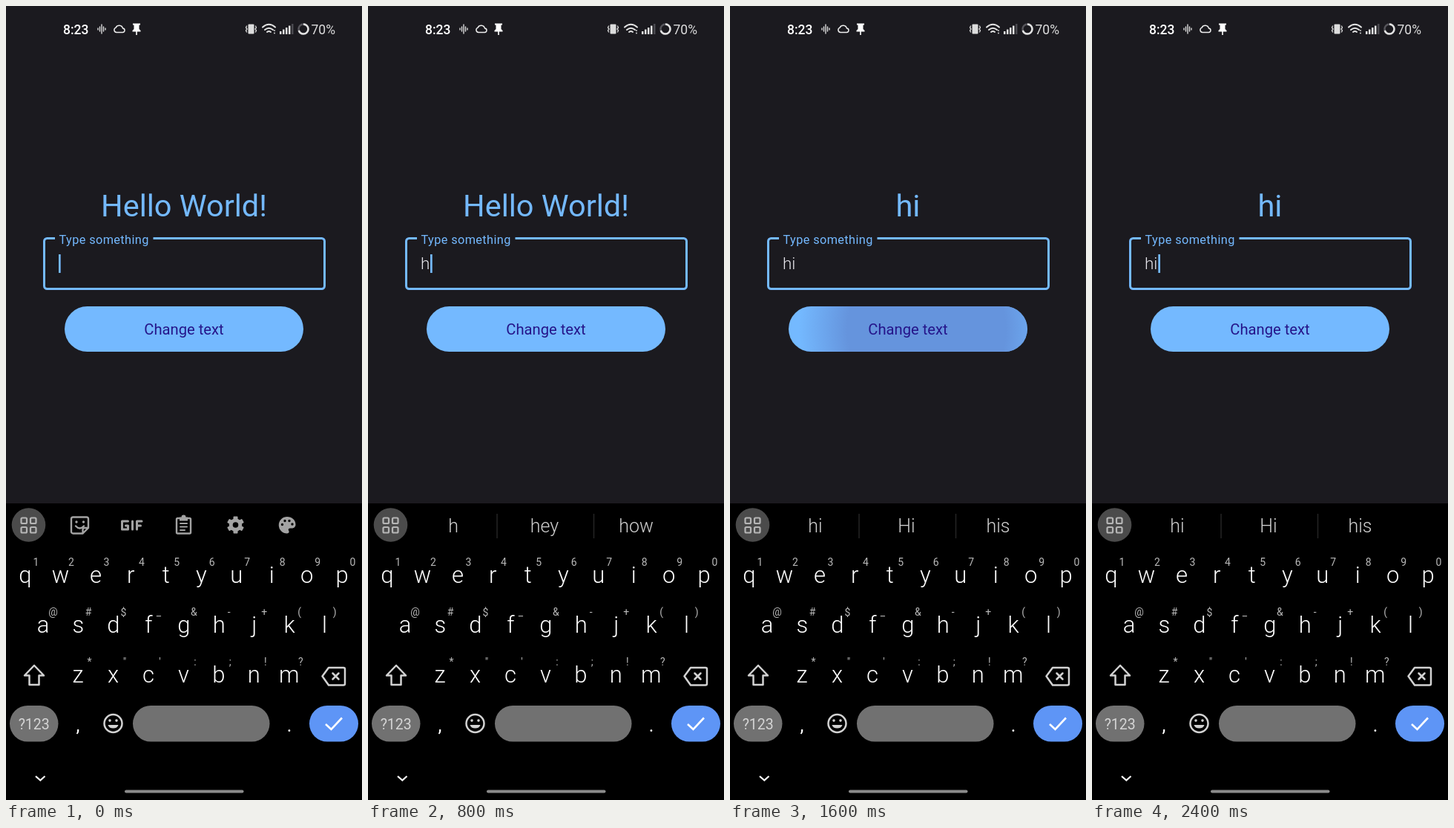
Recreate the animation shown at these times as an HTML page. Size 480x1068 px, loop 2.5 s.

```html
<!DOCTYPE html>
<html lang="en">
<head>
<meta charset="utf-8">
<title>Change text</title>
<style>
  html, body { margin: 0; width: 100%; height: 100%; overflow: hidden; background: #1b1a1f; }
  svg { display: block; width: 100%; height: 100%; }
  text { font-family: Roboto, Inter, sans-serif; fill: #fff; }
  .mid { text-anchor: middle; }
  .status text { font-size: 17.5px; font-weight: 500; }
  .line { fill: none; stroke-linecap: round; stroke-linejoin: round; }
  .tool { stroke: #a3a3a3; stroke-width: 2.4; }
  .key { font-size: 31px; font-weight: 300; }
  .hint { font-size: 14px; fill: #b9b9b9; }
  .word { font-size: 25px; font-weight: 300; fill: #d0d0d0; }
</style>
</head>
<body>
<svg viewBox="0 0 480 1068">
  <defs>
    <radialGradient id="ripple" gradientUnits="userSpaceOnUse" cx="265" cy="435" r="1">
      <stop offset=".62" stop-color="#6594dd"/>
      <stop offset="1" stop-color="#6594dd" stop-opacity="0"/>
    </radialGradient>
  </defs>
  <rect width="480" height="1068" fill="#1b1a1f"/>

  <g class="status">
    <text x="77" y="37.5">8:23</text>
    <path class="line" stroke="#ddd" stroke-width="1.4" d="M124 30v2M126.500 28v6M129 25v12M131.500 28v6M134 30v2"/>
    <path class="line" stroke="#eee" stroke-width="1.5" d="M149 35.500H157a2.700 2.700 0 0 0 .5-5.400a5 5 0 0 0-9.400-1a3.300 3.300 0 0 0 .9 6.400Z"/>
    <path fill="#fff" d="M171 23.500h10v2h-1.500v5.500l2 2v1.500h-4.700v4.500h-1.600v-4.500h-4.700V33l2-2v-5.500H171Z"/>
    <rect x="326.500" y="24.500" width="8" height="13" rx="1" fill="#ddd"/>
    <path class="line" stroke="#ddd" stroke-width="1.3" d="M324.500 27l-1 2 1.500 2-1.500 2 1 2M336.500 27l1 2-1.500 2 1.500 2-1 2"/>
    <g class="line" stroke="#e2e2e2" stroke-width="2">
      <path d="M346 28.500q8.500-7.500 17 0M349 32q5.500-4.500 11 0M352 35q2.500-2 5 0"/>
      <path d="M362 33v.1M362 36.500v.1" stroke-width="1.8"/>
    </g>
    <path fill="#e2e2e2" d="M369 34h2.500v4H369ZM373 31.500h2.500V38H373ZM377 29h2.500v9H377ZM381 26.500h2.500V38H381Z"/>
    <path fill="#4b4a50" d="M385 24h2.500v14H385Z"/>
    <circle cx="401" cy="31" r="6.500" fill="none" stroke="#55545a" stroke-width="2.500"/>
    <circle cx="401" cy="31" r="6.500" fill="none" stroke="#e2e2e2" stroke-width="2.500" pathLength="100"
      stroke-dasharray="70 30" transform="rotate(-90 401 31)"/>
    <text x="411.500" y="37.500" style="fill:#ddd;font-weight:400">70%</text>
  </g>

  <text id="title" class="mid" x="240" y="282.500" style="font-size:41.500px;fill:#74b9ff"></text>
  <path fill="none" stroke="#74b9ff" stroke-width="3"
    d="M66 312.500H55.500a4 4 0 0 0-4 4V376.500a4 4 0 0 0 4 4H425.500a4 4 0 0 0 4-4V316.500a4 4 0 0 0-4-4H198.500"/>
  <text x="71.500" y="320" style="font-size:16.300px;letter-spacing:.4px;fill:#74b9ff">Type something</text>
  <text id="field" x="71" y="354" style="font-size:22.500px;font-weight:300;fill:#e6e5eb"></text>
  <rect id="cursor" y="334" width="2.700" height="25" fill="#74b9ff"/>
  <rect x="79" y="404" width="322" height="61" rx="30.500" fill="#74b9ff"/>
  <rect id="press" x="79" y="404" width="322" height="61" rx="30.500" fill="url(#ripple)"/>
  <text class="mid" x="240" y="442" style="font-size:20.200px;fill:#25158a">Change text</text>

  <rect y="669" width="480" height="399"/>
  <circle cx="30.500" cy="698" r="22.800" fill="#4b4b4b"/>
  <g class="line" stroke="#b5b5b5" stroke-width="2.200">
    <rect x="20.500" y="688.500" width="7.500" height="7.500" rx="1.500"/>
    <rect x="33" y="688.500" width="7.500" height="7.500" rx="1.500"/>
    <rect x="20.500" y="701" width="7.500" height="7.500" rx="1.500"/>
    <rect x="33" y="701" width="7.500" height="7.500" rx="1.500"/>
  </g>

  <g id="tools">
    <g class="line tool">
      <path d="M90.500 687.500h18a2.500 2.500 0 0 1 2.500 2.500v12l-7.500 7.500h-13a2.500 2.500 0 0 1-2.500-2.500v-17a2.500 2.500 0 0 1 2.500-2.500ZM111 702h-5a2.500 2.500 0 0 0-2.500 2.500v5"/>
      <path d="M95 694v.1M104.500 694v.1" stroke-width="3.400"/>
      <path d="M94 699.500q5.500 6 11 0"/>
      <path d="M164.500 693H156.500V704H164.500V699H161.500M170.500 693V704M176.500 704V693H183M176.500 699H181.500" stroke-width="3"/>
      <path d="M234 689H231.500a1.500 1.500 0 0 0-1.500 1.500V708a1.500 1.500 0 0 0 1.500 1.500H247.500a1.500 1.500 0 0 0 1.500-1.500V690.500a1.500 1.500 0 0 0-1.500-1.500H245"/>
      <path d="M235 696H244M235 700.500H244M235 705H241" stroke-width="2"/>
    </g>
    <path fill="#a3a3a3" d="M234 687.500h2.500a3 3 0 0 1 6 0H245V692.500H234Z"/>
    <g id="gear" fill="#a3a3a3"><circle cx="309.500" cy="698" r="8.700"/></g>
    <circle cx="309.500" cy="698" r="3.800"/>
    <path fill="#a3a3a3" d="M379 687a11 11 0 0 0 0 22.500c2.500 0 3.300-2 2.200-3.700c-1.200-2 0-3.300 1.800-3.300h2.500c3 0 5-2.300 5-5c0-6-5-10.500-11.500-10.500Z"/>
    <path class="line" stroke="#000" stroke-width="3.400" d="M372.500 697.500v.1M376 692.500v.1M382 692.500v.1M386 697v.1"/>
  </g>
  <g id="words">
    <path stroke="#242424" stroke-width="1.500" d="M174 683V716M304.500 683V716"/>
    <text class="mid word" x="115" y="708"></text>
    <text class="mid word" x="238" y="708"></text>
    <text class="mid word" x="361.500" y="708"></text>
  </g>

  <g id="keys"></g>

  <g class="line" stroke="#d2d2d2" stroke-width="2.500">
    <path d="M38 887L51 900.500H44.500V913H31.500V900.500H25Z"/>
    <path d="M435 890H455a2 2 0 0 1 2 2V911.500a2 2 0 0 1-2 2H435L426.500 901.500ZM440.500 897.500l8 8M448.500 897.500l-8 8"/>
    <circle cx="144.500" cy="965" r="12"/>
    <path d="M140 961v.1M149 961v.1" stroke-width="3.600"/>
  </g>
  <path fill="#d2d2d2" d="M137.500 967h14a7.200 6 0 0 1-14 0Z"/>
  <g fill="#717171">
    <rect x="5" y="941" width="65.500" height="48.500" rx="24.200"/>
    <rect x="171" y="941" width="184.500" height="48.500" rx="24.200"/>
    <rect x="409" y="941" width="66" height="48.500" rx="24.200" fill="#5e95f6"/>
  </g>
  <text class="mid" x="37.700" y="973" style="font-size:19.500px;fill:#d4d4d4">?123</text>
  <text class="mid" x="97" y="976" style="font-size:25px">,</text>
  <text class="mid" x="382" y="976" style="font-size:25px">.</text>
  <path fill="none" stroke="#fff" stroke-width="2.600" d="M431 966L438.500 973L453 957.500"/>
  <path fill="none" stroke="#fff" stroke-width="2.200" d="M40 1036L46.300 1041.500L52.500 1036"/>
  <rect x="160" y="1054.500" width="160.500" height="4" rx="2" fill="#8b8b8b"/>
</svg>
<script>
const $ = id => document.getElementById(id);
const LOOP = 2500, STEP = 100;
const TYPE_H = 700, TYPE_I = 1100, PRESS = 1400, CHANGE = 1550;

const rows = [
  { letters: "qwertyuiop", hints: "1234567890", x: 26, y: 776, hintX: 14.5 },
  { letters: "asdfghjkl", hints: "@#$_&-+()", x: 50, y: 843, hintX: 13.5 },
  { letters: "zxcvbnm", hints: "*\"':;!?", x: 97, y: 910, hintX: 15.5 },
];
const escapeText = s => s.replace("&", "&amp;");
$("keys").innerHTML = rows.map(({ letters, hints, x, y, hintX }) =>
  [...letters].map((letter, i) => {
    const keyX = x + i * 47.45;
    return `<text class="mid key" x="${keyX}" y="${y}">${letter}</text>` +
      `<text class="mid hint" x="${keyX + hintX}" y="${y - 23}">${escapeText(hints[i])}</text>`;
  }).join("")).join("");

$("gear").innerHTML += [0, 60, 120].map(a =>
  `<rect x="306.500" y="686.500" width="6" height="23" rx="1" transform="rotate(${a} 309.500 698)"/>`).join("");

const clamp = v => Math.max(0, Math.min(1, v));
const show = (el, on) => el.setAttribute("visibility", on ? "visible" : "hidden");
const wordSlots = document.querySelectorAll(".word");

function draw(t) {
  const typed = t < TYPE_H ? "" : t < TYPE_I ? "h" : "hi";
  const words = typed === "h" ? ["h", "hey", "how"] : ["hi", "Hi", "his"];
  $("title").textContent = t < CHANGE ? "Hello World!" : "hi";
  $("field").textContent = typed;
  $("cursor").setAttribute("x", [71, 84, 89.3][typed.length]);

  // Each keystroke restarts the 500 ms blink.
  const sinceKey = t < TYPE_H ? t + 300 : t - (t < TYPE_I ? TYPE_H : TYPE_I);
  show($("cursor"), sinceKey % 1000 < 500);

  show($("tools"), !typed);
  show($("words"), typed);
  wordSlots.forEach((slot, i) => slot.textContent = words[i]);

  const spread = clamp((t - PRESS) / 350);
  $("ripple").setAttribute("r", 1 + 300 * spread);
  $("press").setAttribute("opacity", t <= PRESS ? 0 : 1 - clamp((t - 1650) / 350));
}

const start = performance.now();
function tick() {
  const t = (performance.now() - start) % LOOP;
  draw(Math.floor(t / STEP) * STEP);
  requestAnimationFrame(tick);
}
tick();
</script>
</body>
</html>
```
